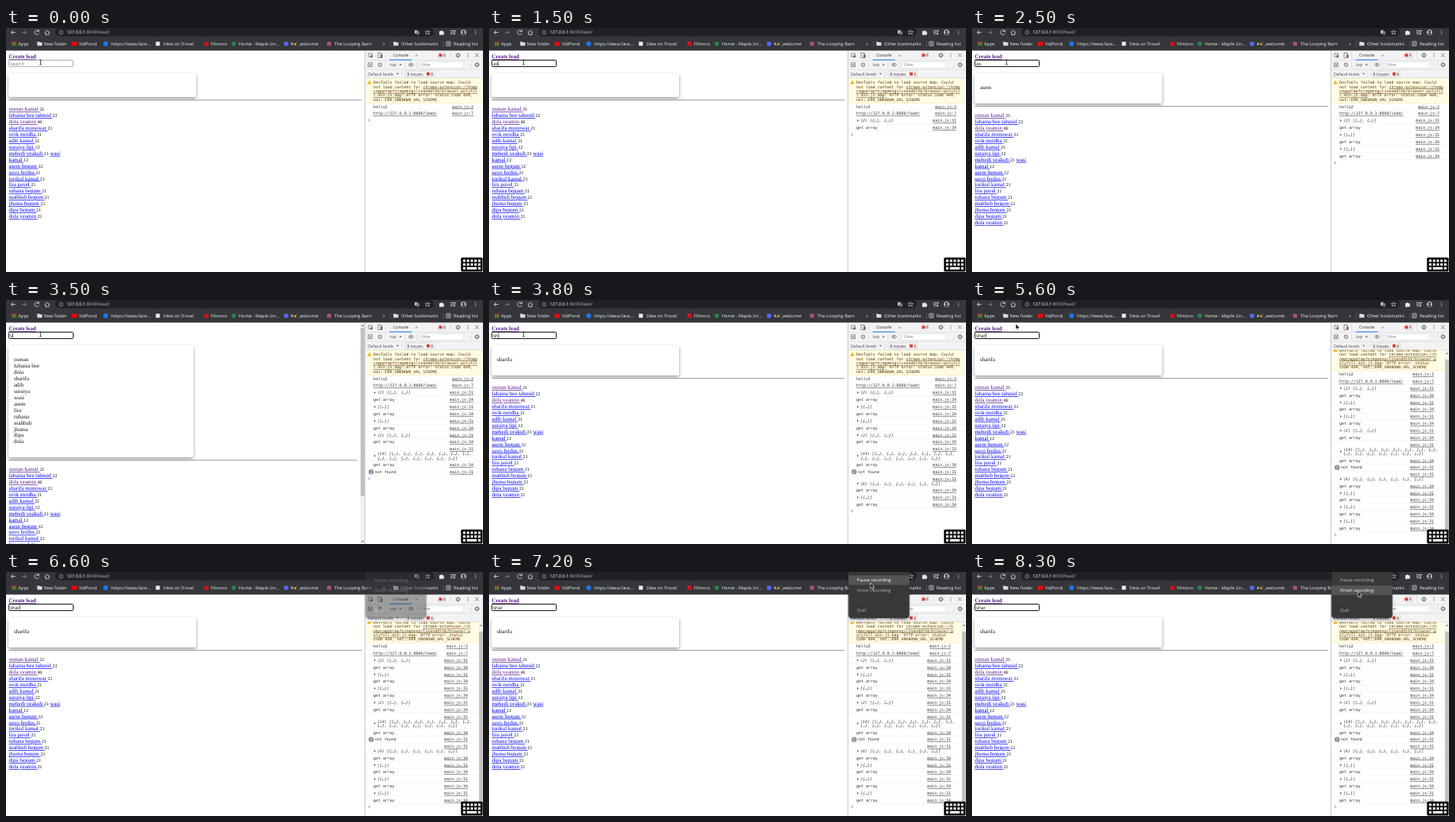
An HTML page for the animation above (8.5 s loop, 600 by 307 pixels).

```html
<!DOCTYPE html>
<html lang="en">
<head>
<meta charset="utf-8">
<title>Live lead search</title>
<style>
html, body { margin: 0; width: 100%; height: 100%; overflow: hidden; background: #fff; }
svg { display: block; width: 600px; height: 307px; }
text { white-space: pre; text-rendering: geometricPrecision; }
.ui { font: 5.7px "Open Sans", "Noto Sans", sans-serif; }
.small { font-size: 5.2px; }
.page { font: 7px "Liberation Serif", serif; }
.field { font: 5.9px "Open Sans", sans-serif; }
.mono { font: 4.95px "DejaVu Sans Mono", monospace; }
.num { font-size: 5.8px; fill: #000; }
.link { text-decoration: underline; text-decoration-thickness: .45px; }
.bold { font-weight: bold; }
.italic { font-style: italic; }
</style>
</head>
<body>
<svg id="stage" viewBox="0 0 600 307"></svg>
<script>
const LOOP = 8500, STEP = 7.92, ROW = 8.87, LINE = 5.45;
const stage = document.getElementById('stage');
const pen = document.createElement('canvas').getContext('2d');

const people = [
  ['osman', 'kamal', 21], ['lubaina bee', 'tahmid', 22], ['dola', 'yeamin', 46],
  ['sharifa', 'monowar', 21], ['ovik', 'mridha', 21], ['adib', 'kamal', 21],
  ['suraiya', 'lipi', 12], ['mehedi', 'yeakub', 21], ['wasi', 'kamal', 12],
  ['asem', 'begum', 12], ['suvo', 'ferdos', 21], ['torikul', 'kamal', 21],
  ['lira', 'pavel', 21], ['ruhana', 'begum', 21], ['mahbub', 'begum', 21],
  ['jhuma', 'begum', 21], ['dipa', 'begum', 21], ['dola', 'yeamin', 21]
];
const find = key => key ? people.map(p => p[0]).filter(n => n.includes(key)) : [];

// Console history: [text or hit count, source line]
const log = [['hello2', 2], ['http://127.0.0.1:8000/lead/', 7]];
const search = key => log.push([find(key).length, 31], ['get array', 34]);
['as', 'ase', 'ase', 'as', 'a'].forEach(search);
log.push(['not found', 31]);
['s', 'sh', 'sha', 'shar'].forEach(search);

const events = [
  [0, { query: '', shown: '', rows: 2, focus: false, caret: false, badge: false }],
  [700, { focus: true, caret: true }],
  [1300, { query: 'a' }], [1400, { query: 'as' }], [1500, { rows: 4 }],
  [1600, { shown: 'as' }], [1700, { query: 'ase' }],
  [1800, { rows: 6, shown: 'ase' }], [1900, { rows: 8 }],
  [2300, { caret: false }], [2500, { query: 'as' }],
  [2600, { rows: 10, shown: 'as', caret: true }],
  [2700, { query: 'a', rows: 12, shown: 'a' }],
  [2900, { query: '', rows: 13 }], [3100, { badge: true }],
  [3500, { query: 's' }], [3600, { rows: 15, shown: 's' }],
  [3700, { query: 'sh' }], [3800, { rows: 17, shown: 'sh' }],
  [3900, { query: 'sha' }], [4000, { query: 'shar', rows: 19 }],
  [4100, { rows: 21, shown: 'shar' }],
  [4600, { caret: false }], [5200, { caret: true }], [5700, { caret: false }],
  [6400, { caret: true }], [7000, { caret: false }], [7500, { caret: true }],
  [8000, { caret: false }]
];
const stateAt = t => Object.assign({}, ...events.filter(e => e[0] <= t).map(e => e[1]));

const text = (x, y, s, cls, fill, more = '') =>
  `<text x="${x}" y="${y}" class="${cls}" fill="${fill}" ${more}>${s}</text>`;
const rect = (x, y, w, h, fill, more = '') =>
  `<rect x="${x}" y="${y}" width="${w}" height="${h}" fill="${fill}" ${more}/>`;
const dot = (x, y, r, fill, more = '') =>
  `<circle cx="${x}" cy="${y}" r="${r}" fill="${fill}" ${more}/>`;
const line = (d, color, w = 0.8) =>
  `<path d="${d}" fill="none" stroke="${color}" stroke-width="${w}"/>`;
const shape = (d, fill, more = '') => `<path d="${d}" fill="${fill}" ${more}/>`;
const folder = x => shape(`M${x} 17.2h2.4l.8 .9h3v4.2h-6.2z`, '#dcdde0');
const gear = (x, y) => dot(x, y, 1.8, 'none', 'stroke="#666" stroke-width="1.1"') +
  dot(x, y, 2.7, 'none', 'stroke="#666" stroke-width=".8" stroke-dasharray="1.06"');
const dots = (x, y, color) => [-2, 0, 2].map(d => dot(x, y + d, 0.6, color)).join('');

function browserBar() {
  const pale = '#e4e5e8';
  let s = rect(0, 0, 600, 28.4, '#35363a') + rect(62, -1, 476, 11.6, '#202124', 'rx="5.8"');
  s += line('M12 5.5H6.6M9 3L6.5 5.5L9 8', pale) + line('M20 5.5h5.4M23 3l2.5 2.5L23 8', '#85868a');
  s += line('M41 4A2.8 2.8 0 1 0 41.3 6.6M41.4 2.2v2.2h-2.2', pale);
  s += line('M48.9 5.6L51.9 2.9L54.9 5.6M49.8 5v3.4h4.2V5', pale);
  s += dot(69.3, 5.5, 2.4, 'none', 'stroke="#b9babd" stroke-width=".6"') + line('M69.3 5.1v1.8M69.3 3.8v.6', '#b9babd', 0.6);
  s += text(76.3, 7.4, '127.0.0.1<tspan fill="#aeb0b4">:8000/lead/</tspan>', 'ui', '#fff');
  s += rect(514, 2.8, 3.8, 4.3, '#b9babd') + rect(516.5, 4.2, 3.6, 4.2, '#77797e');
  s += shape('M530.3 2.5l.9 2h2.2l-1.7 1.4 .6 2.2-2-1.2-2 1.2 .6-2.2-1.7-1.4h2.2z', 'none', `stroke="${pale}" stroke-width=".6"`);
  s += shape('M545 4h1.7a1 1 0 0 1 2 0h1.7v1.5a1 1 0 0 1 0 2v1.3H545z', pale);
  s += line('M559 3.4h5.2M559 5.4h3.6M559 7.4h2.6M564.4 7.4V3.4h1.6', pale) + dot(563.6, 7.5, 0.9, pale);
  s += dot(575.5, 5.5, 3.5, '#aab4c0') + dot(575.5, 4.5, 1.3, '#22252b') + shape('M573 8.3q2.5-4.6 5 0z', '#22252b');
  s += dots(590.5, 5.5, pale);

  ['#ea4335', '#fbbc05', '#34a853'].forEach((c, i) => {
    for (let j = 0; j < 3; j++) s += rect(7.5 + j * 2, 17 + i * 2, 1.3, 1.3, c);
  });
  s += folder(39.3) + rect(82.8, 17.3, 6.2, 5, '#f00') + dot(125.4, 19.8, 3, '#1877f2');
  s += rect(188.5, 17.3, 5, 5, '#eceff1') + rect(249.6, 17, 5, 5.4, '#d5101c');
  s += dot(286.5, 19.8, 2.8, '#25834d') + dot(352.3, 19.8, 2.9, '#5865f2') + dot(406.3, 19.8, 2.8, '#a84f77');
  const marks = [[15.3, 'Apps'], [47.5, 'New folder'], [92, 'VidPond'], [132.3, 'https://www.face...'],
    [198, 'View on Trovel'], [258, 'Filmoro'], [292.8, 'Home - Maple Un...'], [358, '#'],
    [367, '_welcome'], [413, 'The Looping Barn'], [474, '»'], [497, 'Other bookmarks'], [563, 'Reading list']];
  s += marks.map(m => text(m[0], 21.8, m[1], 'ui', '#eeeff0')).join('');
  s += shape('M362 22.3l1.5-3.8 2.3 2.3z', '#f2b632') + dot(365.5, 18, 0.7, '#e65a7c');
  s += line('M483.5 16v8M550.5 16v8', '#65666a', 0.5) + folder(487.3);
  s += rect(553.8, 17, 5.4, 5.4, 'none', `stroke="${pale}" stroke-width=".7" rx=".6"`);
  return s + line('M555 18.8h3M555 20.6h3', pale, 0.7);
}

function page(st) {
  const hits = find(st.shown), grow = hits.length * STEP;
  const scrolls = hits.length > 10, right = scrolls ? 441 : 447.5;
  let s = text(3.5, 38.4, 'Create lead', 'page link bold', '#551a8b');
  s += st.focus
    ? rect(3.7, 40.4, 80.8, 8.2, '#fff', 'rx="1" stroke="#101010" stroke-width="1"')
    : rect(3.7, 40.4, 80.8, 8.2, '#fff', 'rx=".7" stroke="#777" stroke-width=".6"');
  s += st.query || st.focus && st.rows > 2
    ? text(5.2, 46.6, st.query, 'field', '#111')
    : text(5.2, 46.6, 'search', 'field', '#777');
  if (st.caret) {
    pen.font = '59px "Open Sans", sans-serif';
    s += rect(5.3 + pen.measureText(st.query).width / 10, 41.6, 0.6, 6, '#000');
  }
  s += rect(3.5, 57, scrolls ? 232 : 235.5, 29.8 + grow, '#fff', 'rx="2.5" filter="url(#shadow)"');
  s += hits.map((n, i) => text(10, 77.4 + i * STEP, n, 'page', '#111')).join('');
  s += line(`M3.5 ${90.6 + grow}H${right}`, '#888', 0.8);

  const tag = (name, age, color) => `<tspan class="link" fill="${color}">${name} </tspan><tspan class="num">${age}</tspan>`;
  const rows = people.map(([first, last, age], i) => tag(`${first} ${last}`, age, i === 0 || i === 2 ? '#551a8b' : '#0000ee'));
  // The ninth link wraps between its two words.
  rows[7] += ` <tspan class="link" fill="#0000ee">${people[8][0]}</tspan>`;
  rows[8] = tag(people[8][1], people[8][2], '#0000ee');
  s += rows.map((r, i) => text(3.5, 104.4 + grow + i * STEP, r, 'page', '#000')).join('');
  if (scrolls) {
    s += rect(445.5, 28.4, 6, 279, '#f1f1f1') + rect(446.2, 35, 4.6, 212, '#bfbfbf');
    s += shape('M446.8 33l1.7-2 1.7 2z', '#666') + shape('M446.8 303l1.7 2 1.7-2z', '#666');
  }
  return s;
}

function consoleRows(st) {
  const full = st.rows > 20, edge = full ? 581 : 588;
  const mono = (x, y, str, cls = '', more = '') => text(x, y + 1.8, str, 'mono ' + cls, '#303030', more);
  const link = str => `<tspan class="link">${str}</tspan>`;
  const warning = full
    ? ['DevTools failed to load source map: Could', 'not load content for ' + link('chrome-extension://h'),
      link('nmpcagpplmpfojmgmnngilcnanddlhb/browser-p'), link('olyfill.min.js.map') + ': HTTP error: status',
      'code 404, net::ERR_UNKNOWN_URL_SCHEME']
    : ['DevTools failed to load source map: Could', 'not load content for ' + link('chrome-extension://hnmp'),
      link('cagpplmpfojmgmnngilcnanddlhb/browser-polyfil'), link('l.min.js.map') + ': HTTP error: status code 404,',
      'net::ERR_UNKNOWN_URL_SCHEME'];
  let s = rect(452, 63, 148, 31.6, '#fffbe5') + line('M452 63h148M452 94.6h148', '#f3e6ab', 0.5);
  s += warning.map((w, i) => text(462, 70.1 + i * LINE, w, 'mono', '#5c3c00')).join('');
  s += shape('M457 65.6l2.7 4.9h-5.4z', '#e8ab00') + line('M457 67.2v1.5M457 69.1v.7', '#fff', 0.6);

  let y = 98.8;
  for (const [item, src] of log.slice(0, st.rows)) {
    s += mono(edge, y, `main.js:${src}`, 'link', 'text-anchor="end"');
    let extra = 0;
    if (typeof item === 'number') {
      const objs = Array(item).fill('{…}');
      const chunks = [];
      while (objs.length) chunks.push(objs.splice(0, 7).join(', '));
      const body = `${item > 1 ? `(${item}) ` : ''}[${chunks.join(',\n')}]`.split('\n');
      extra = item > 2 ? body.length * LINE : 0;
      const top = extra ? y + LINE + 0.3 : y;
      const mid = top + (body.length - 1) * LINE / 2;
      s += shape(`M463 ${mid - 1.5}l2.2 1.5-2.2 1.5z`, '#666');
      s += body.map((b, i) => mono(467, top + i * LINE, b, 'italic')).join('');
    } else {
      const counted = st.badge && item === 'not found';
      if (counted) s += dot(459.3, y, 3.2, '#8c8c9c') + text(459.3, y + 1.8, '2', 'ui small', '#fff', 'text-anchor="middle"');
      s += mono(counted ? 464 : 462, y, item, src === 7 ? 'link' : '');
    }
    y += ROW + extra;
    s += line(`M452 ${y - ROW / 2}h148`, '#ededed', 0.5);
  }
  s += line(`M456 ${y - 1.9}l1.7 1.6-1.7 1.6`, '#367cf1', 0.9);
  return full ? `<g transform="translate(0 -5.5)">${s}</g>` : s;
}

function devtools(st) {
  let s = rect(451.5, 28.4, 149, 279, '#fff') + consoleRows(st);
  if (st.rows > 20) {
    s += rect(594.5, 62, 6, 245, '#f1f1f1') + rect(595.1, 75, 4.8, 225, '#c1c1c1');
    s += shape('M595.8 68l1.7-2 1.7 2z', '#888') + shape('M595.8 303l1.7 2 1.7-2z', '#888');
  }
  s += rect(451.5, 28.4, 149, 34.2, '#f3f3f3');
  s += line('M451.5 40.6h149M451.5 52.2h149M451.5 62.6h149', '#cfcfcf', 0.5) + line('M451.5 28.4V307', '#b5b5b5', 0.7);
  s += rect(456, 32, 4.6, 4.6, 'none', 'stroke="#666" stroke-width=".7"') + shape('M458 34l4.2 1.5-1.8 .7-.8 1.8z', '#555');
  s += rect(468, 31.5, 4.2, 5.8, 'none', 'stroke="#666" stroke-width=".7"') + rect(471, 33.5, 2.6, 4, '#666');
  s += line('M477.5 30.5v8', '#ccc', 0.5) + text(487, 36.3, 'Console', 'ui small', '#222');
  s += rect(482.5, 39.6, 28, 1, '#1a73e8') + text(515, 36.3, '»', 'ui', '#555');
  const badge = (x, y, w) => rect(x - w, y - 3.8, w + 10.5, 7.6, 'none', 'rx="1" stroke="#cacaca" stroke-width=".5"') +
    rect(x + 1, y - 2, 4, 4, '#e53935', 'rx=".8"') + text(x + 6.2, y + 1.9, '8', 'ui small', '#333');
  s += badge(543.5, 34.3, 0) + line('M559.5 30.5v8', '#ccc', 0.5) + gear(568.5, 34.3) + dots(581, 34.3, '#666');
  s += line('M590 32l4.6 4.6M594.6 32l-4.6 4.6', '#666');

  s += rect(455.5, 43.9, 5.2, 4.8, 'none', 'stroke="#666" stroke-width=".7"') + shape('M457.3 44.9l2.2 1.4-2.2 1.4z', '#555');
  s += dot(470.5, 46.3, 2.3, 'none', 'stroke="#666" stroke-width=".8"') + line('M469 44.7l3.1 3.2', '#666');
  s += line('M477.5 42.5v8M501.5 42.5v8M516.5 42.5v8M585.5 42.5v8', '#ccc', 0.5) + text(483, 48.1, 'top', 'ui small', '#444');
  s += shape('M494.5 45.5h3.4l-1.7 2.1z', '#666');
  s += line('M506 46.3q3.5-4 7 0q-3.5 4-7 0z', '#666', 0.7) + dot(509.5, 46.3, 1.1, '#666');
  s += rect(520, 42.6, 55, 7.6, '#fff', 'stroke="#d5d5d5" stroke-width=".5"') + text(522, 48.1, 'Filter', 'ui small', '#777');
  s += gear(592.5, 46.3);
  s += text(455, 59.6, 'Default levels', 'ui small', '#444') + shape('M491 56.8h3.2l-1.6 2z', '#666');
  s += line('M498 54v7', '#ccc', 0.5) + text(504.5, 59.6, '8 Issues:', 'ui small', '#333') + badge(528, 57.7, 26);
  return s;
}

function keyboard() {
  let s = rect(572.3, 288.8, 27.2, 17.7, '#000', 'rx="1.5"');
  for (let r = 0; r < 2; r++)
    for (let c = 0; c < 5; c++) s += rect(575 + c * 4.7, 291.4 + r * 4.7, 3, 3, '#fff');
  return s + rect(575, 300.8, 3, 3, '#fff') + rect(579.7, 300.8, 12.4, 3, '#fff') + rect(593.8, 300.8, 3, 3, '#fff');
}

const moves = [
  [5600, 55, 30], [5700, 79, 8], [5800, 86, -12], [6800, 473, -12], [6900, 475, 3],
  [7400, 483, 21], [7600, 485, 27], [7800, 488, 43], [8000, 488, 44], [8200, 486, 27], [8300, 485.5, 24.5]
];
function mouseAt(t) {
  const next = moves.findIndex(m => m[0] > t);
  if (next < 0) return moves[moves.length - 1].slice(1);
  const [t0, x0, y0] = moves[next - 1], [t1, x1, y1] = moves[next];
  const k = (t - t0) / (t1 - t0);
  return [x0 + (x1 - x0) * k, y0 + (y1 - y0) * k];
}

function trayMenu(t, y) {
  if (t < 6600) return '';
  const items = [['Pause recording', 10.3], ['Finish recording', 23], ['Quit', 48]];
  const alpha = Math.min(1, 0.45 + (t - 6600) / 300);
  let s = shape('M452.2 0h76.6v54q0 4-4 4h-68.6q-4 0-4-4z', '#38383a', 'filter="url(#soft)"');
  s += line('M452.5 35.7h76', '#4b4b4d', 0.6);
  for (const [label, mid] of items) {
    const hover = y > 0 && Math.abs(y - mid) < 6.3;
    if (hover) s += rect(452.2, mid - 6, 76.6, 12, '#545456');
    s += text(463, mid + 2, label, 'ui', hover ? '#fff' : '#b9b9ba');
  }
  return `<g opacity="${alpha}">${s}</g>`;
}

function pointer(t, x, y) {
  if (t < 5600) return line('M42 40q1.5 0 1.5 .8q0-.8 1.5-.8M43.5 40.6v5M42 46.2q1.5 0 1.5-.8q0 .8 1.5 .8', '#111', 0.7);
  if (y < -8) return '';
  return shape(`M${x} ${y}v7l1.7-1.5 1.1 2.5 1.2-.5-1.1-2.4h2.3z`, '#111', 'stroke="#fff" stroke-width=".6"');
}

const defs = `<defs>
  <filter id="shadow" x="-10%" y="-30%" width="120%" height="170%"><feDropShadow dx="0" dy="2" stdDeviation="2" flood-opacity=".42"/></filter>
  <filter id="soft" x="-10%" y="-10%" width="120%" height="130%"><feDropShadow dx="0" dy="1.5" stdDeviation="1.5" flood-opacity=".35"/></filter>
</defs>`;
const bar = browserBar(), keys = keyboard();

function draw(t) {
  const st = stateAt(t), [x, y] = t < 5600 ? [0, 0] : mouseAt(t);
  stage.innerHTML = defs + rect(0, 0, 600, 307, '#fff') + page(st) + devtools(st) +
    bar + keys + trayMenu(t, y) + pointer(t, x, y);
}

const start = performance.now();
let last = -1;
function tick() {
  const t = Math.floor((performance.now() - start) % LOOP / 100) * 100;
  if (t !== last) draw(last = t);
  requestAnimationFrame(tick);
}
tick();
</script>
</body>
</html>
```
